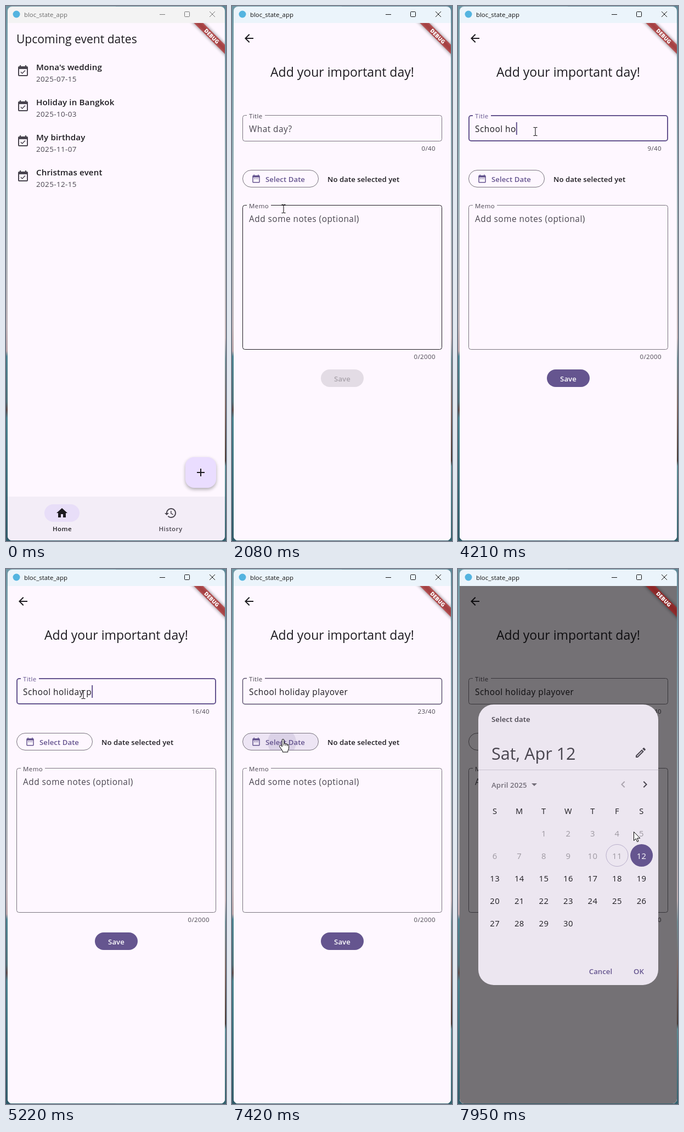
Animation, 401 px wide and 976 px high, one loop 8 s. Source, as an HTML page:

```html
<!DOCTYPE html>
<html lang="en">
<head>
<meta charset="utf-8">
<title>Event dates</title>
<style>
  html, body { margin: 0; width: 100%; height: 100%; overflow: hidden; }
  svg { display: block; width: 401px; height: 976px; }
  text { font-family: "Open Sans", "Noto Sans", sans-serif; white-space: pre; }
</style>
</head>
<body>
<svg id="stage" viewBox="0 0 401 976"></svg>
<script>
const INK = '#1d1b20', SOFT = '#49454f', LINE = '#79747e', PRIMARY = '#65558f', PAGE = '#fef7ff';
const LOOP = 8000, TITLE = 'School holiday playover';

const ICONS = {
  event: 'M16.53 11.06L15.47 10l-4.88 4.88-2.12-2.12-1.06 1.06L10.59 17l5.94-5.94zM19 3h-1V1h-2v2H8V1H6v2H5c-1.11 0-1.99.9-1.99 2L3 19c0 1.1.89 2 2 2h14c1.1 0 2-.9 2-2V5c0-1.1-.9-2-2-2zm0 16H5V8h14v11z',
  home: 'M10 20v-6h4v6h5v-8h3L12 3 2 12h3v8z',
  history: 'M13 3c-4.97 0-9 4.03-9 9H1l3.89 3.89.07.14L9 12H6c0-3.87 3.13-7 7-7s7 3.13 7 7-3.13 7-7 7c-1.93 0-3.68-.79-4.94-2.06l-1.42 1.42C8.27 19.99 10.51 21 13 21c4.97 0 9-4.03 9-9s-4.03-9-9-9zm-1 5v5l4.28 2.54.72-1.21-3.5-2.08V8z',
  add: 'M19 13h-6v6h-2v-6H5v-2h6V5h2v6h6z',
  back: 'M20 11H7.83l5.59-5.59L12 4l-8 8 8 8 1.41-1.41L7.83 13H20z',
  date: 'M9 11H7v2h2zm4 0h-2v2h2zm4 0h-2v2h2zm2-7h-1V2h-2v2H8V2H6v2H5c-1.11 0-1.99.9-1.99 2L3 20c0 1.1.89 2 2 2h14c1.1 0 2-.9 2-2V6c0-1.1-.9-2-2-2zm0 16H5V9h14z',
  edit: 'M14.06 9.02l.92.92L5.92 19H5v-.92l9.06-9.06M17.66 3c-.25 0-.51.1-.7.29l-1.83 1.83 3.75 3.75 1.83-1.83c.39-.39.39-1.02 0-1.41l-2.34-2.34c-.2-.2-.45-.29-.71-.29zm-3.6 3.19L3 17.25V21h3.75L17.81 9.94z',
  left: 'M15.41 7.41L14 6l-6 6 6 6 1.41-1.41L10.83 12z',
  right: 'M10 6L8.59 7.41 13.17 12l-4.58 4.58L10 18l6-6z',
  drop: 'M7 10l5 5 5-5z'
};

const attrs = o => Object.entries(o).map(([k, v]) => `${k}="${v}"`).join(' ');
const rect = (x, y, width, height, rx, fill, more = {}) =>
  `<rect ${attrs({ x, y, width, height, rx, fill, ...more })}/>`;
const icon = (name, x, y, fill = SOFT, scale = 1) =>
  `<path d="${ICONS[name]}" fill="${fill}" transform="translate(${x} ${y}) scale(${scale})"/>`;
const text = (x, y, str, size, fill = INK, more = {}) =>
  `<text ${attrs({ x, y, 'font-size': size, fill, ...more })}>${str}</text>`;
const body = { 'letter-spacing': 0.5 };
const small = { 'letter-spacing': 0.4 };
const bold = { 'font-weight': 600, 'letter-spacing': 0.06 };
const mid = { 'text-anchor': 'middle' };
const end = { 'text-anchor': 'end' };

function eventRow([title, date], i) {
  const y = 64 * i;
  return icon('event', 19, 107 + y) +
    text(55, 117 + y, title, 15.1, INK, { 'font-weight': 600, 'letter-spacing': 0.15 }) +
    text(55, 138 + y, date, 13.4, SOFT, small);
}

function field(id, y, height, label, gap) {
  return rect(19.5, y + 0.5, 363, height - 1, 4, 'none', { id, stroke: LINE }) +
    rect(27, y - 2, gap, 5, 0, PAGE) +
    text(31, y + 6, label, 11.5, SOFT, { id: id + 'Label', ...small });
}

function calendar() {
  const colX = c => 67.3 + 44.55 * c;
  const faded = 'rgba(29,27,32,.38)';
  let out = [...'SMTWTFS'].map((d, c) => text(colX(c), 447, d, 14.6, INK, { ...mid, ...body })).join('');
  out += `<circle cx="290" cy="522.5" r="20" fill="none" stroke="${PRIMARY}" stroke-opacity=".38"/>`;
  out += `<circle cx="334.6" cy="522.5" r="20.5" fill="${PRIMARY}"/>`;
  for (let day = 1; day <= 30; day++) {
    const cell = day + 1;
    const fill = day === 12 ? '#fff' : day < 12 ? faded : INK;
    out += text(colX(cell % 7), 488 + 41 * Math.floor(cell / 7), day, 14.8, fill, { ...mid, ...body });
  }
  return out;
}

const gradient = (id, stops) =>
  `<linearGradient id="${id}" x2="0" y2="1">${stops.map(([o, c]) =>
    `<stop offset="${o}" stop-color="${c}"/>`).join('')}</linearGradient>`;

const defs = `<defs>
  ${gradient('leftEdge', [[0, '#6f98a5'], [.35, '#9db3b9'], [.6, '#bfb4b8'], [.645, '#b9a4a8'], [.655, '#4b8391'], [.74, '#4d7078'], [.755, '#5d4a4a'], [.77, '#47808c'], [1, '#2f5a68']])}
  ${gradient('rightEdge', [[0, '#5f8897'], [.4, '#9fb0b6'], [.62, '#c0b0b3'], [.66, '#6f8d94'], [.75, '#7d6660'], [.85, '#453833'], [.86, '#5a8a92'], [1, '#33606c']])}
  <clipPath id="window"><rect x="3" y="1" width="396" height="974" rx="8"/></clipPath>
  <clipPath id="page"><rect x="3" y="31" width="396" height="944"/></clipPath>
  <clipPath id="fabClip"><rect x="327" y="823" width="56" height="56" rx="16"/></clipPath>
  <clipPath id="pickClip"><rect x="19" y="299" width="138.5" height="32" rx="16"/></clipPath>
  <filter id="blur" x="-50%" y="-100%" width="200%" height="300%"><feGaussianBlur stdDeviation="3"/></filter>
</defs>`;

const titleBar = rect(3, 1, 396, 30, 0, '#f3f3f3', { id: 'bar' }) +
  '<circle cx="19" cy="15" r="6.5" fill="#54b4e0"/>' +
  text(33, 20, 'bloc_state_app', 11.4, '#6b6b6b', { id: 'barText' }) +
  '<path id="controls" fill="none" stroke="#777" d="M280 15.5h10M326.5 10.5h7q1 0 1 1v7q0 1-1 1h-7q-1 0-1-1v-7q0-1 1-1zM371 10l10 10M381 10l-10 10"/>';

const events = [["Mona's wedding", '2025-07-15'], ['Holiday in Bangkok', '2025-10-03'],
  ['My birthday', '2025-11-07'], ['Christmas event', '2025-12-15']];

const home = `<g id="home">${rect(3, 31, 396, 944, 0, PAGE)}
  ${text(19, 68, 'Upcoming event dates', 21.1)}
  ${events.map(eventRow).join('')}
  ${rect(327, 826, 56, 56, 16, '#000', { opacity: 0.3, filter: 'url(#blur)' })}
  ${rect(327, 823, 56, 56, 16, '#eaddff', { id: 'fab' })}
  <circle id="fabRipple" cx="362" cy="856" r="34" fill="#21005d" opacity=".1" clip-path="url(#fabClip)"/>
  ${icon('add', 343, 839, INK)}
  ${rect(3, 895, 396, 80, 0, '#f3edf7')}
  ${rect(70, 909, 64, 32, 16, '#e8def8')}
  ${icon('home', 90, 913, INK)}${icon('history', 288, 913)}
  ${text(102.5, 958, 'Home', 11.5, INK, { ...bold, ...small, ...mid })}
  ${text(300, 958, 'History', 11.5, SOFT, { ...bold, ...small, ...mid })}</g>`;

const form = `<g id="form">${rect(3, 31, 396, 944, 0, PAGE)}
  ${icon('back', 19, 47, INK)}
  ${text(201, 129, 'Add your important day!', 23, INK, mid)}
  ${field('title', 199, 48, 'Title', 33)}
  ${text(31, 230, 'What day?', 15.36, SOFT, { id: 'hint', ...body })}
  ${text(31, 230, '', 15.36, INK, { id: 'typed', ...body })}
  ${rect(31, 212, 2, 23, 0, PRIMARY, { id: 'caret' })}
  ${text(371, 264, '0/40', 11.5, SOFT, { id: 'count', ...end, ...small })}
  ${rect(19.5, 299.5, 138, 31, 15.5, 'none', { id: 'pick', stroke: LINE })}
  <circle id="pickRipple" cx="91" cy="316" r="26" fill="${PRIMARY}" opacity=".13" clip-path="url(#pickClip)"/>
  ${icon('date', 35, 306, PRIMARY, 0.75)}
  ${text(61, 321, 'Select Date', 13.2, PRIMARY, bold)}
  ${text(174, 321, 'No date selected yet', 13.2, INK, bold)}
  ${field('memo', 363, 264, 'Memo', 44)}
  ${text(31, 394, 'Add some notes (optional)', 15.36, SOFT, body)}
  ${text(371, 644, '0/2000', 11.5, SOFT, { ...end, ...small })}
  ${rect(162, 663, 78, 32, 16, '#e3dce5', { id: 'save' })}
  ${text(201, 685, 'Save', 13.2, '#a9a3ab', { id: 'saveText', ...bold, ...mid })}</g>`;

const dialog = `<g id="dialog">${rect(3, 31, 396, 944, 0, 'rgba(0,0,0,.54)')}
  ${rect(37, 247, 328, 512, 28, '#ece6f0')}
  ${text(61, 279, 'Select date', 13.2, SOFT, bold)}
  ${text(61, 348, 'Sat, Apr 12', 30.6, SOFT)}
  ${icon('edit', 321, 323)}
  ${rect(37, 366, 328, 1, 0, '#cac4d0')}
  ${text(61, 399, 'April 2025', 13.2, '#726d78', { ...bold, 'letter-spacing': 0.12 })}
  ${icon('drop', 127, 381, '#726d78')}${icon('left', 289, 381, '#aaa4ae')}${icon('right', 329, 381)}
  ${calendar()}
  ${text(260, 739, 'Cancel', 13.2, PRIMARY, { ...bold, ...mid })}
  ${text(329.5, 739, 'OK', 13.2, PRIMARY, { ...bold, ...mid })}</g>`;

const banner = `<g clip-path="url(#page)"><g transform="translate(399 31) rotate(45)">
  ${rect(-60, 28, 120, 12, 0, '#000', { opacity: 0.5, filter: 'url(#blur)' })}
  ${rect(-60, 28, 120, 12, 0, '#b71c1c', { 'fill-opacity': 0.63 })}
  ${text(0, 37.6, 'DEBUG', 9.8, '#fff', { ...mid, 'font-weight': 800 })}</g></g>`;

const pointer = `<g id="pointer" stroke="#000" fill="#fff">
  <path id="arrow" d="M.5.5V16.5L4.2 13 6.7 18.6 9 17.6 6.6 12.1H11.8Z"/>
  <path id="hand" d="M-1.7 2Q-1.7.5 0 .5Q1.7.5 1.7 2V8Q4.5 7.3 5 9Q7.6 8.6 8 10.2Q10.6 10 10.6 12.5V16Q10.6 19 8.8 21.5V24H-.8V22L-6 14.5Q-7.3 12-5 11.4Q-3.4 11.4-1.7 14ZM1.7 8v4M5 9v3.5M8 10.2v3"/>
  <path id="beam" fill="none" d="M-3.5-7.5h2.5l1 .8 1-.8h2.5M0-6.7V6.7M-3.5 7.5h2.5l1-.8 1 .8h2.5"/></g>`;

document.getElementById('stage').innerHTML = defs +
  rect(0, 0, 401, 976, 0, 'url(#leftEdge)') + rect(200, 0, 201, 976, 0, 'url(#rightEdge)') +
  `<g clip-path="url(#window)">${titleBar}<g clip-path="url(#page)">${home}${form}${dialog}</g>${banner}</g>` + pointer;

const $ = id => document.getElementById(id);
const set = (id, o) => { for (const k in o) $(id).setAttribute(k, o[k]); };
const show = (id, on) => set(id, { visibility: on ? 'visible' : 'hidden' });

// start, step length, steps, end x, end y
const moves = [
  [720, 70, 8, 362, 856],
  [1880, 66, 4, 94, 370],
  [2150, 70, 5, 141, 229],
  [6780, 70, 7, 93, 310],
  [7490, 70, 1, 92, 310],
  [7730, 73, 4, 320, 479]
];
// time, characters typed
const typing = [[3230, 1], [3610, 3], [3760, 4], [3900, 5], [3980, 6], [4050, 7], [4210, 9],
  [4360, 10], [4500, 11], [4580, 12], [4650, 13], [4810, 14], [5070, 15], [5220, 16], [5350, 17],
  [5430, 18], [5650, 19], [5890, 20], [6110, 21], [6280, 22], [6450, 23]];

const ease = p => p * (2 - p);
function pointerAt(t) {
  let x = 400, y = 968;
  for (const [start, dt, steps, toX, toY] of moves) {
    if (t < start) break;
    const p = ease(Math.min(1, (Math.floor((t - start) / dt) + 1) / steps));
    x += (toX - x) * p;
    y += (toY - y) * p;
  }
  return [x, y];
}

function targetAt(x, y, t) {
  const inside = (l, top, r, b) => x >= l && x <= r && y >= top && y <= b;
  if (t >= 7490) return '';
  if (t < 1410) return inside(327, 823, 383, 879) ? 'fab' : '';
  if (inside(19, 199, 383, 247)) return 'title';
  if (inside(19, 299, 157, 331)) return 'pick';
  return inside(19, 363, 383, 627) ? 'memo' : '';
}

function draw(t) {
  const between = (a, b) => t >= a && t < b;
  const [x, y] = pointerAt(t);
  const over = targetAt(x, y, t);
  const kind = over === 'title' || over === 'memo' ? 'beam' : over ? 'hand' : 'arrow';
  set('pointer', { transform: `translate(${x.toFixed(1)} ${y.toFixed(1)})` });
  for (const k of ['arrow', 'hand', 'beam']) show(k, t >= 720 && k === kind);

  const active = t >= 1340;
  set('bar', { fill: active ? '#ebf4fb' : '#f3f3f3' });
  set('barText', { fill: active ? '#111' : '#6b6b6b' });
  set('controls', { stroke: active ? '#111' : '#777' });

  set('fab', { fill: over === 'fab' ? '#dacbf2' : '#eaddff' });
  set('fabRipple', { opacity: between(1340, 1540) ? 0.1 : 0 });
  const scale = t < 1470 ? 0.93 : t < 1540 ? 0.985 : 1;
  set('form', {
    opacity: t < 1410 ? 0 : t < 1470 ? 0.5 : 1,
    transform: `translate(201 503) scale(${scale}) translate(-201 -503)`
  });

  const focused = between(2430, 7350), leaving = between(7350, 7490);
  const inset = focused ? 1 : 0.5;
  set('title', {
    x: 19 + inset, y: 199 + inset, width: 364 - 2 * inset, height: 48 - 2 * inset,
    'stroke-width': focused ? 2 : leaving ? 1.4 : 1,
    stroke: focused ? PRIMARY : leaving ? '#574d6b' : over === 'title' ? INK : LINE
  });
  set('titleLabel', { fill: focused ? PRIMARY : SOFT });
  set('memo', { stroke: over === 'memo' ? INK : LINE });

  const typed = typing.reduce((n, [at, chars]) => t >= at ? chars : n, 0);
  $('typed').textContent = TITLE.slice(0, typed);
  $('count').textContent = typed + '/40';
  set('hint', { opacity: typed ? 0 : 1 });
  const caretOn = between(2430, 2930) || between(3230, 6950);
  set('caret', { x: 31 + (typed ? $('typed').getComputedTextLength() : 0), opacity: caretOn ? 1 : 0 });

  set('pick', { fill: over === 'pick' ? '#ede5f4' : 'none' });
  set('pickRipple', { r: t < 7420 ? 14 : 26, opacity: leaving ? 0.13 : 0 });
  set('save', { fill: t >= 3310 ? PRIMARY : '#e3dce5' });
  set('saveText', { fill: t >= 3380 ? '#fff' : '#a9a3ab' });
  set('dialog', { opacity: t >= 7490 ? 1 : 0 });
}

const begin = performance.now();
function tick() {
  draw((performance.now() - begin) % LOOP);
  requestAnimationFrame(tick);
}
tick();
</script>
</body>
</html>
```
